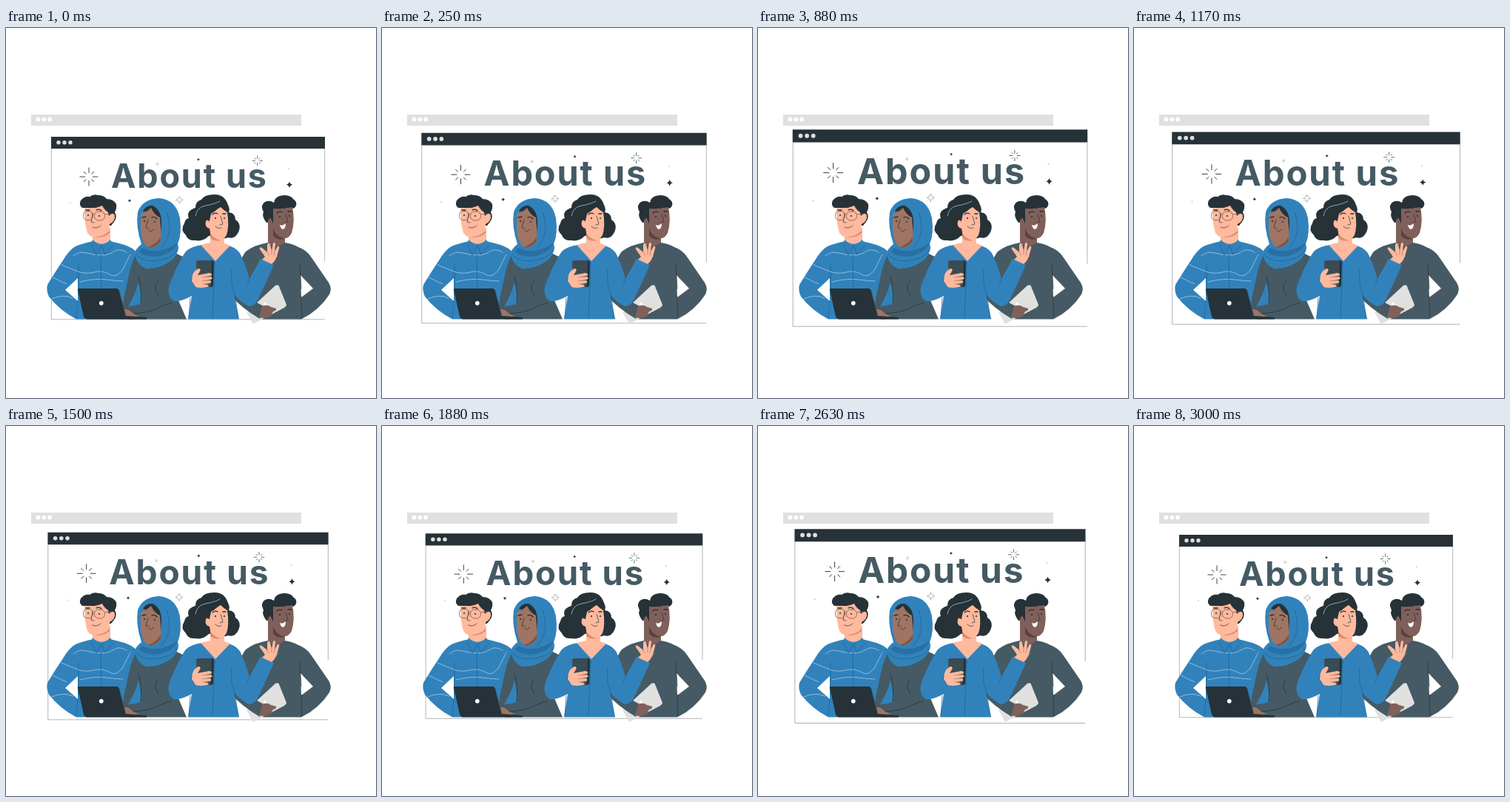
Recreate the animation shown at these times as an HTML page. Size 500 px wide and 500 px high, loop 3040 ms.

```html
<!DOCTYPE html>
<html lang="en">
<head>
<meta charset="utf-8">
<title>About us</title>
<style>
  html, body { margin: 0; width: 100%; height: 100%; overflow: hidden; background: #fff; }
  svg { display: block; width: 100vw; height: 100vh; }
  .dark { fill: #263238; }
  .slate { fill: #455a64; }
  .blue { fill: #3182bb; }
  .light { fill: #ffb99d; }
  .tan { fill: #a07463; }
  .brown { fill: #80605a; }
  .pale { fill: #e0e0e0; }
  .white { fill: #fff; }
  .line { fill: none; stroke: #263238; stroke-width: .7; stroke-linecap: round; stroke-linejoin: round; }
  .soft { stroke: #b5d5e9; }
  .seam { stroke: #1f608e; }
  .brow { stroke-width: 1.3; }
  .title { font: 750 45px Inter, "Open Sans", sans-serif; letter-spacing: 1.8px; word-spacing: -.5px; text-anchor: middle; }
</style>
</head>
<body>
<svg viewBox="0 0 500 500">
  <path class="pale" d="M34 117H399V132H34Z"/>
  <g class="white"><circle cx="43.5" cy="123.6" r="2.9"/><circle cx="51.2" cy="123.6" r="2.9"/><circle cx="59" cy="123.6" r="2.9"/></g>

  <g id="window">
    <path d="M61.4 163V393.8H430.6M430.7 163V315" fill="none" stroke="#7d878c" stroke-width=".6"/>
    <path class="dark" d="M61 146.9H431V162.9H61Z"/>
    <g class="pale"><circle cx="71" cy="154.7" r="2.7"/><circle cx="79" cy="154.7" r="2.7"/><circle cx="87" cy="154.7" r="2.7"/></g>
    <text class="title slate" x="247.8" y="215.7">About us</text>
    <g id="sparkles"></g>
  </g>

  <!-- man with glasses -->
  <g>
    <path class="blue" fill-rule="evenodd" d="M118 288Q104 291 94 295Q85 300 77 314Q65 332 56 347Q54 354 58 363Q73 382 95 393.5H174L177 304Q172 297 160 293Q150 290 140 288ZM80 354L97 338L97 369Z"/>
    <path class="line seam" d="M98 320V352M97 369L95 392"/>
    <path class="line soft" d="M91 308Q99 301 109 304T129 307T146 302T163 303M75 320Q87 325 97 329T119 330T140 333T158 326L168 306M63 337Q71 341 82 346M100 343Q120 338 136 340T158 342M62 366Q78 359 90 365"/>
    <path class="line seam" d="M128 306L129 352"/>
    <path class="light" d="M117 270H141V290L129 295L117 289Z"/>
    <path class="blue" d="M117 286Q121 291 129 292Q137 291 141 286L145 293L134 306L129 295L122 307L115 293Z"/>
    <path class="line seam" d="M115 293L122 307L129 294L134 306L145 293"/>
    <path class="dark" d="M103 243Q98 239 101 233Q106 227 113 228Q118 224 125 226Q132 226 136 231Q145 231 149 238Q150 244 147 249Q151 255 146 262L142 267H136L130 244Z"/>
    <path class="light" d="M106 243Q119 245 130 240Q133 246 138 249L139 254Q144 248 147 253Q148 261 140 265Q140 278 129 283Q115 285 110 277Q106 265 106 243Z"/>
    <path d="M119 283Q132 282 140 274V277Q132 284 119 283Z" fill="#d98c75"/>
    <path class="line brow" d="M108 246L113 246M122 246Q126 244 129 247"/>
    <g class="dark"><circle cx="111" cy="253" r="1.1"/><circle cx="126" cy="254" r="1.1"/></g>
    <path class="line" d="M117 250L115 262L119 263M117 269Q123 272 128 267"/>
    <g fill="none" stroke="#7c5b51" stroke-width=".8"><rect x="104.5" y="247.5" width="13" height="12" rx="5"/><rect x="119.5" y="248" width="14" height="12" rx="5.5"/><path d="M117.5 252H119.5M133.5 252L143 251"/></g>
  </g>

  <!-- man with tablet -->
  <g>
    <path class="slate" fill-rule="evenodd" d="M354 290Q336 293 324 302Q315 313 303 357L343 393.5H399Q423 382 437 360Q441 352 436 344L412 309Q406 300 395 296Q386 291 376 290ZM398 334L415 352L399 364Z"/>
    <path class="line" d="M397 320L399 352M399 363L400 392"/>
    <path class="brown" d="M354 262H377V290Q366 299 354 291Z"/>
    <path class="dark" d="M352 263Q345 254 348 249Q343 239 350 235Q356 232 362 236Q363 227 375 226Q385 226 388 231Q395 236 391 242Q387 246 380 243L361 263Z"/>
    <path class="brown" d="M361 244Q374 245 387 242Q391 261 386 277Q382 286 371 284Q362 281 361 267Q352 265 353 257Q356 251 361 258Z"/>
    <path d="M361 271Q365 282 377 285Q366 288 361 280Z" fill="#5c423b"/>
    <path class="dark" d="M349 250L361 245V264L357 256L352 263Z"/>
    <path class="line brow" d="M366 250Q369 247 373 249M381 248L386 248"/>
    <g class="dark"><circle cx="370" cy="255" r="1.1"/><circle cx="383" cy="254" r="1.1"/></g>
    <path class="line" d="M378 252L381 262L377 263"/>
    <path class="white" d="M370 266Q374 268 378 264Q378 271 374 272Q371 271 370 266Z"/>
    <path class="pale" d="M325 384L364 348Q368 346 369 349L379 374Q379 376 376 378L334 400Z"/>
    <path class="slate" d="M304 352Q321 362 349 377L343 393Q319 379 303 361Z"/>
    <path class="line" d="M306 352Q323 363 349 377"/>
    <path class="brown" d="M346 376Q353 373 358 377L365 379Q366 382 361 383L358 389Q351 394 342 391Z"/>
    <circle class="white" cx="350" cy="373" r="2"/>
  </g>

  <!-- woman with headscarf -->
  <g>
    <path class="slate" d="M180 302Q173 307 168 325L159 366L158 384L166 393.5H244L233 368L239 309L222 301Z"/>
    <path class="blue" d="M179 344Q184 361 182 373Q174 376 165 376Q174 362 179 344Z"/>
    <path class="line" d="M206 342Q197 350 206 362M164 386Q190 386 204 379T224 372M179 335Q184 354 182 372"/>
    <path class="blue" d="M178 249Q184 231 207 230Q230 232 235 257Q238 278 232 292Q236 300 225 313Q207 327 189 325Q175 319 174 303Q176 298 183 292Q175 268 178 249Z"/>
    <path d="M184 297Q207 308 232 290Q228 303 208 308Q190 311 179 302Z" fill="#2870a4"/>
    <path class="line seam" d="M217 249Q228 277 209 298M176 307Q189 319 211 313T230 300"/>
    <path class="dark" d="M185 247Q190 239 198 240Q211 246 210 266L208 287L199 252Z"/>
    <path class="tan" d="M182 251Q190 249 196 243Q200 252 208 256Q210 278 209 289Q203 298 191 296Q184 290 182 275Z"/>
    <path d="M191 296Q203 293 209 282V288Q201 299 191 296Z" fill="#7b564b"/>
    <path class="line brow" d="M184 256L189 255M197 256Q201 254 204 258"/>
    <g class="dark"><circle cx="187" cy="261" r="1.1"/><circle cx="201" cy="262" r="1.1"/></g>
    <path class="line" d="M192 259L189 270L193 271M193 274Q197 276 200 272"/>
  </g>

  <!-- laptop -->
  <path class="tan" d="M159 380Q166 379 172 386L180 390H160Z"/>
  <path class="dark" d="M97 354Q96 352 99 352H149Q152 352 153 355L162 389L190 391V393.5H109Q106 393 105 390Z"/>
  <path d="M153 355L162 390" stroke="#455a64" stroke-width=".7"/>
  <circle class="white" cx="128.8" cy="371.8" r="2.9"/>

  <!-- woman with phone -->
  <g>
    <path class="dark" d="M256 243Q256 234 264 232Q268 225 281 225Q295 224 300 239Q303 245 301 249Q310 250 310 259Q319 265 314 276Q309 286 300 283Q292 287 287 279L274 281Q266 289 256 287Q246 288 243 280Q235 273 241 264Q242 258 247 257Q243 247 256 243Z"/>
    <path class="blue" d="M266 293Q250 295 243 302Q234 314 221 346Q217 357 223 366Q229 374 251 362L246 393.5H315L308 360Q319 372 328 376Q335 376 340 368Q350 347 362 320L344 312L329 339Q323 318 316 304Q309 295 296 293Z"/>
    <path class="light" d="M276 274H295V291L303 294L283 315L263 293L276 290Z"/>
    <path class="light" d="M274 250Q283 247 290 242Q294 246 299 249Q302 268 298 280Q293 288 284 285Q276 281 275 271Q268 269 270 261Q273 256 275 261Z"/>
    <path d="M276 277Q281 285 290 287Q280 289 276 283Z" fill="#d98c75"/>
    <path class="dark" d="M270 246L290 240Q283 248 277 251L275 261L270 259Z"/>
    <path class="line soft" d="M256 254Q258 242 270 240T289 234"/>
    <path class="line brow" d="M279 252Q282 249 286 251M293 251L297 251"/>
    <g class="dark"><circle cx="283" cy="257" r="1.1"/><circle cx="295" cy="257" r="1.1"/></g>
    <path class="line" d="M290 254L293 265L289 266M283 268Q287 272 291 270"/>
    <path class="line seam" d="M282 316L279 392M249 338L248 352M249 364L247 392M305 326Q303 348 309 360L314 392M329 339L326 346"/>
    <path class="dark" d="M259 314H278Q281 314 281 317L280 347Q280 350 277 350H261Z"/>
    <path fill="#3b4b53" d="M257 317Q257 314 260 314H276Q278 314 278 317L277 347Q277 350 275 350H261Q258 350 258 347Z"/>
    <path class="light" d="M251 343L252 334Q254 328 260 325Q264 325 262 329L259 334L275 331Q280 332 277 335L269 337L277 336Q280 338 277 340L269 342L276 341Q279 344 275 345L268 347L273 347Q275 350 271 350Q263 352 256 350Z"/>
    <path class="line" stroke-opacity=".45" d="M265 337L276 335M265 342L277 340M266 346L275 345"/>
    <path class="blue" d="M225 351L249 340Q254 346 256 352L232 369Z"/>
    <path class="line seam" d="M249 340Q254 346 256 352"/>
    <path class="light" d="M346 313L350 309L343 299Q342 295 346 297L353 303L353 293Q355 288 357 293L359 301L361 291Q364 288 364 293L363 302L367 295Q370 294 369 298L366 309Q363 316 359 319Z"/>
    <path class="line" stroke-opacity=".45" d="M353 303L355 307M359 301V306M363 302L362 307"/>
  </g>
</svg>
<script>
  const DARK = '#263238', PALE = '#d5d9db';
  const FRAME_RATE = 24, LOOP = 3040, BEAT = 3000;
  const CENTER = [246, 270.5];
  // [share of the beat, scale]
  const KEYS = [[0, 1], [.2, 1.1], [.6, 1], [.8, 1.1], [1, 1]];

  function star(x, y, r, color) {
    const q = r * .2;
    return `<path fill="${color}" d="M${x} ${y - r}Q${x + q} ${y - q} ${x + r} ${y}Q${x + q} ${y + q} ${x} ${y + r}` +
      `Q${x - q} ${y + q} ${x - r} ${y}Q${x - q} ${y - q} ${x} ${y - r}Z"/>`;
  }

  function burst(x, y, r, width) {
    let d = '';
    for (let i = 0; i < 8; i++) {
      const a = i * Math.PI / 4, outer = i % 2 ? r * .78 : r;
      const at = k => `${x + k * Math.cos(a)} ${y + k * Math.sin(a)}`;
      d += `M${at(r * .4)}L${at(outer)}`;
    }
    return `<path d="${d}" stroke="${DARK}" stroke-width="${width}"/>`;
  }

  document.getElementById('sparkles').innerHTML =
    burst(112, 201, 12.5, .9) + burst(339.7, 179.5, 7, .7) + burst(234.3, 232.3, 5, .5) +
    star(383, 211.7, 4.2, DARK) + star(260, 177.7, 2, DARK) + star(167, 233.3, 2.3, DARK) +
    star(204.5, 184, 3, PALE) + star(382, 190.3, 1.7, PALE) + star(87, 236.3, 1.7, PALE);

  function scaleAt(share) {
    const i = Math.max(1, KEYS.findIndex(([at]) => at >= share));
    const [t0, s0] = KEYS[i - 1], [t1, s1] = KEYS[i];
    return s0 + (s1 - s0) * (share - t0) / (t1 - t0);
  }

  const pane = document.getElementById('window');
  const [cx, cy] = CENTER;

  function draw(ms) {
    const step = Math.floor((ms % LOOP + 4.9) * FRAME_RATE / 1000);
    const share = Math.min(1, step * 1000 / FRAME_RATE / BEAT);
    pane.setAttribute('transform', `translate(${cx} ${cy}) scale(${scaleAt(share)}) translate(${-cx} ${-cy})`);
  }

  const start = performance.now();
  function tick() {
    draw(performance.now() - start);
    requestAnimationFrame(tick);
  }
  tick();
</script>
</body>
</html>
```
